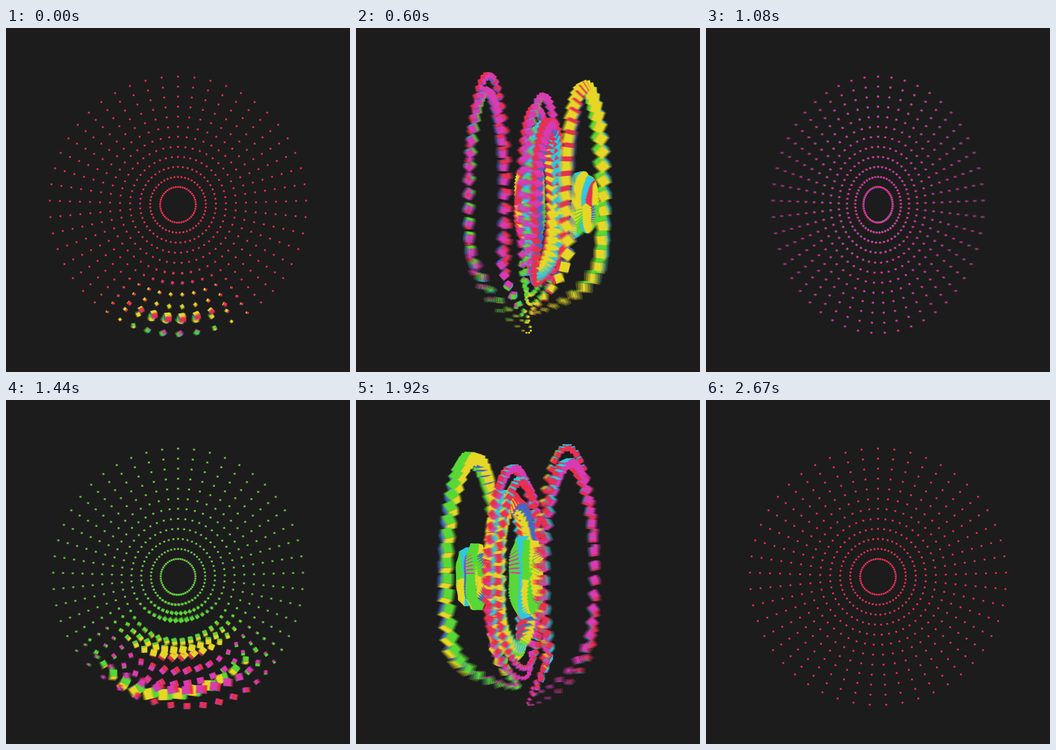
These frames come from a looping animation (540 px wide and 540 px high, 2700 ms). An HTML page with a canvas:

```html
<!DOCTYPE html>
<html>
<head>
<meta charset="utf-8">
<style>
html, body { margin: 0; height: 100%; overflow: hidden; background: #1c1c1c; }
canvas { display: block; }
</style>
</head>
<body>
<canvas id="stage" width="540" height="540"></canvas>
<script>
const SIZE = 540, LOOP = 2700, WAVE = 1350, STEP = 30;
const SAMPLES = 4, SHUTTER = 20;
const PER_RING = 49, CX = 270, CY = 277.5;
const BACKGROUND = '#1c1c1c';
const TAU = Math.PI * 2;

// Pose of each ring at the height of the wave: radius, depth, cube size, pitch, yaw
const RINGS = [
  [37, 98, 13, -1, 1.2],
  [44, 84, 14, 0.3, 1.9],
  [49, -4, 16, 0.3, 1.2],
  [54, 8, 16, -0.4, 1.9],
  [116, 20, 15, -1.2, 0.3],
  [121, 28, 17, -1.1, -0.4],
  [126, 34, 15, 1, -0.5],
  [150, 12, 11, 0.5, 5.3],
  [170, 24, 11, 0.4, 4.5],
  [185, 90, 18, 0.5, 1.3],
  [178, -66, 13, 0.6, 4.5],
  [203, -63, 9, 0.4, 5.4]
];

// Axis, direction, colour
const FACES = [
  [0, -1, '#e6d727'], [0, 1, '#d93bb0'],
  [1, -1, '#2fc9de'], [1, 1, '#4568c2'],
  [2, -1, '#58d836'], [2, 1, '#e8304f']
];

const clamp = v => Math.max(0, Math.min(1, v));
const smooth = v => { v = clamp(v); return v * v * (3 - 2 * v); };
const mix = (a, b, k) => a + (b - a) * k;

const screen = document.getElementById('stage').getContext('2d');
const buffer = document.createElement('canvas');
buffer.width = buffer.height = SIZE;
const pen = buffer.getContext('2d');

const cubes = [];
RINGS.forEach((pose, ring) => {
  const radius = 28 + ring * 15.75;
  for (let i = 0; i < PER_RING; i++) {
    const angle = i / PER_RING * TAU;
    const reach = Math.hypot(radius * Math.sin(angle), radius * Math.cos(angle) + 252);
    cubes.push({ pose, radius, angle, reach });
  }
});

// How far a cube has left its resting place, 0 to 1
function lift(reach, local) {
  const start = (reach - 165) * 1.25;
  const end = 610 + (reach - 51) * 1.1;
  return smooth((local - start) / 220) * (1 - smooth((local - end + 220) / 220));
}

function axes(pitch, yaw, roll) {
  const cp = Math.cos(pitch), sp = Math.sin(pitch);
  const cy = Math.cos(yaw), sy = Math.sin(yaw);
  const cr = Math.cos(roll), sr = Math.sin(roll);
  return [[1, 0, 0], [0, cp, sp], [0, -sp, cp]].map(([x, y, z]) => {
    const tx = x * cy + z * sy;
    return [tx * cr - y * sr, tx * sr + y * cr, z * cy - x * sy];
  });
}

function place(cube, theta, local) {
  const [poseRadius, depth, poseSize, posePitch, poseYaw] = cube.pose;
  const e = lift(cube.reach, local);
  const radius = mix(cube.radius, poseRadius, e);
  const angle = cube.angle + e * Math.PI / PER_RING;
  const x = radius * Math.sin(angle), z = depth * e;
  const settle = clamp((local - 780) / 540);
  const turn = TAU * Math.pow(settle, 1.6) * (1 - e);
  return {
    x: CX + x * Math.cos(theta) + z * Math.sin(theta),
    y: CY - radius * Math.cos(angle),
    z: z * Math.cos(theta) - x * Math.sin(theta),
    size: mix(2.8, poseSize, e),
    pitch: e * posePitch * Math.cos(theta / 2)
      + 0.7 * Math.sin(Math.PI * settle) * Math.sin(angle + cube.radius * 0.03) * (1 - e),
    yaw: theta + turn + e * (poseYaw - theta * 0.8 + 0.5 * Math.sin(angle)),
    roll: angle * e
  };
}

function drawCube(c) {
  const basis = axes(c.pitch, c.yaw, c.roll);
  const h = c.size / 2;
  for (const [axis, dir, color] of FACES) {
    const n = basis[axis];
    if (n[2] * dir <= 0.01) continue;
    const u = basis[(axis + 1) % 3], v = basis[(axis + 2) % 3];
    pen.fillStyle = color;
    pen.beginPath();
    for (const [a, b] of [[-1, -1], [1, -1], [1, 1], [-1, 1]]) {
      pen.lineTo(c.x + h * (n[0] * dir + u[0] * a + v[0] * b),
                 c.y + h * (n[1] * dir + u[1] * a + v[1] * b));
    }
    pen.fill();
  }
}

function drawScene(time) {
  const theta = time / LOOP * TAU, local = time % WAVE;
  pen.fillStyle = BACKGROUND;
  pen.fillRect(0, 0, SIZE, SIZE);
  cubes.map(c => place(c, theta, local))
    .sort((a, b) => a.z - b.z)
    .forEach(drawCube);
}

// Average a few moments of the shutter for motion blur
function render(time) {
  for (let k = 0; k < SAMPLES; k++) {
    drawScene(time + k * SHUTTER / SAMPLES);
    screen.globalAlpha = 1 / (k + 1);
    screen.drawImage(buffer, 0, 0);
  }
}

let origin = null, shown = -1;
function tick(now) {
  if (origin === null) origin = now;
  const time = Math.floor((now - origin) % LOOP / STEP) * STEP;
  if (time !== shown) render(shown = time);
  requestAnimationFrame(tick);
}
requestAnimationFrame(tick);
</script>
</body>
</html>
```
